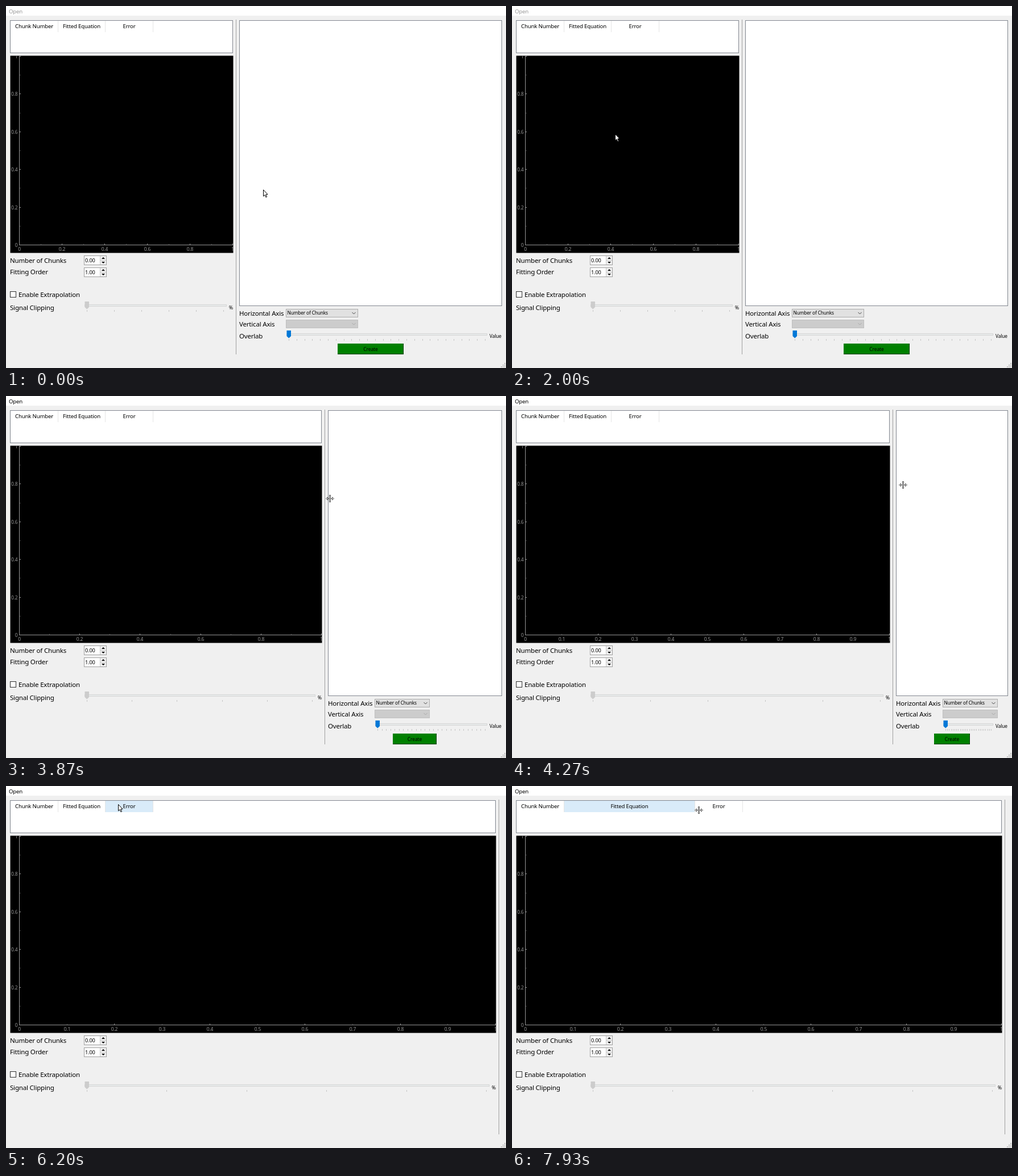
These frames come from a looping animation (879 by 637 pixels, 8 s). An HTML page with a canvas:

```html
<!DOCTYPE html>
<html lang="en">
<head>
<meta charset="utf-8">
<title>Chunk fitting window</title>
<style>
  html, body { margin: 0; width: 100%; height: 100%; overflow: hidden; background: #f0f0f0; }
  canvas { display: block; }
</style>
</head>
<body>
<canvas id="stage" width="879" height="637"></canvas>
<script>
const ctx = document.getElementById('stage').getContext('2d');
const LOOP = 8000, STEP = 1000 / 15, MAX_MOVE = 600, LAG = 63.5;
const GRAB = 2990, PRESS = 3460, COLLAPSE = 4840, LEAVE = 5610;
const COLUMN_GRAB = 6500, COLUMN_DRAG = 7740;

// Pointer stops: arrival time, x, y
const stops = [
  [0, 452, 323], [600, 604, 584], [1100, 645, 430], [1700, 351, 400],
  [2000, 181, 225], [2600, 407, 170], [3600, 404, 176], [3867, 569, 180],
  [4267, 687, 156], [5267, 857, 147], [6200, 197, 32], [6933, 176, 41],
  [7733, 176, 41], [7933, 328, 42]
];

// Rest at a stop, then ease out towards the next one
function pointerAt(t) {
  const next = stops.findIndex(s => s[0] > t);
  if (next < 0) return stops[stops.length - 1].slice(1);
  const [t0, x0, y0] = stops[next - 1], [t1, x1, y1] = stops[next];
  const left = Math.min(1, (t1 - t) / Math.min(MAX_MOVE, t1 - t0));
  const k = 1 - left * left;
  return [x0 + (x1 - x0) * k, y0 + (y1 - y0) * k];
}

function splitAt(t) {
  if (t > COLLAPSE) return 861;
  if (t < PRESS) return 399;
  return Math.min(664, Math.round(pointerAt(t - LAG)[0] - 5));
}

function rect(x, y, w, h, fill) {
  ctx.fillStyle = fill;
  ctx.fillRect(x, y, w, h);
}

function box(x, y, w, h, fill, border) {
  rect(x, y, w, h, border);
  rect(x + 1, y + 1, w - 2, h - 2, fill);
}

function text(str, x, midY, size, color = '#000', align = 'left') {
  ctx.font = `${size}px "Noto Sans", "Open Sans", sans-serif`;
  ctx.letterSpacing = `${-0.0165 * size}px`;
  ctx.textAlign = align;
  ctx.fillStyle = color;
  ctx.fillText(str, x, midY + size * 0.36);
}

function shape(points, fill, stroke, close = true) {
  ctx.beginPath();
  for (const [x, y] of points) ctx.lineTo(x, y);
  if (close) ctx.closePath();
  if (fill) { ctx.fillStyle = fill; ctx.fill(); }
  if (stroke) { ctx.strokeStyle = stroke; ctx.lineWidth = 1; ctx.stroke(); }
}

function spinBox(y, value) {
  box(137, y, 40, 17, '#fff', '#a0a0a0');
  rect(165, y + 1, 11, 15, '#c8c8c8');
  rect(166, y + 1, 10, 7, '#f0f0f0');
  rect(166, y + 9, 10, 7, '#f0f0f0');
  for (const side of [-1, 1]) {
    const base = y + 8.5 + side * 2.5;
    shape([[168, base], [174, base], [171, base + side * 3]], '#000');
  }
  text(value, 139, y + 8.5, 9.2);
}

function comboBox(x, y, w, label, fill, border, arrow) {
  box(x, y, w, 15, fill, border);
  text(label, x + 2.5, y + 7.5, 8.3);
  const cx = x + w - 7.5;
  shape([[cx - 3, y + 6], [cx, y + 9], [cx + 3, y + 6]], null, arrow, false);
}

function slider(x, y, end, lastTick, intervals, color) {
  box(x, y + 5, end - x, 4, '#e7eaea', '#d6d6d6');
  for (let i = 0; i <= intervals; i++)
    rect(Math.round(x + 4 + (lastTick - x - 4) * i / intervals), y + 15, 1, 3, '#c4c4c4');
  const l = x + 0.5, r = x + 8;
  shape([[l, y], [r, y], [r, y + 10], [x + 4.2, y + 13.5], [l, y + 10]], color);
}

function header(split, colEnd, hover) {
  box(7, 25, split - 7, 58, '#fff', '#828790');
  if (hover === 'fitted') rect(91, 26, colEnd - 91, 20, '#d9ebf9');
  if (hover === 'error') rect(colEnd, 26, 84, 20, '#d9ebf9');
  for (const x of [91, colEnd, colEnd + 84]) rect(x, 26, 1, 20, '#e5e5e5');
  text('Chunk Number', 49.5, 36, 9.6, '#000', 'center');
  text('Fitted Equation', (91 + colEnd) / 2 + 0.5, 36, 9.6, '#000', 'center');
  text('Error', colEnd + 42.5, 36, 9.6, '#000', 'center');
}

function plot(split) {
  const gray = '#969696', dim = '#383838';
  ctx.save();
  ctx.beginPath();
  ctx.rect(7.5, 87.5, split - 7, 347);
  ctx.clip();
  rect(7, 87, split, 348, '#000');
  rect(23, 88, 1, 333, gray);
  rect(23, 420, split - 23, 1, gray);
  for (let i = 0; i <= 10; i++) {
    const x = Math.round(23 + (split - 24) * i / 10), y = Math.round(420 - 33.2 * i);
    const major = i % 2 === 0, label = String(i / 10);
    rect(x, 418, 1, 2, major ? gray : dim);
    rect(24, y, 2, 1, major ? gray : dim);
    if (major) text(label, 20.5, y + 0.5, 8.5, gray, 'right');
    if (major || split > 610) text(label, x + 0.5, 428, 8.5, gray, 'center');
  }
  ctx.restore();
}

function leftPanel(split) {
  plot(split);
  text('Number of Chunks', 7, 447.5, 11.5);
  text('Fitting Order', 7, 468, 11.5);
  spinBox(439, '0.00');
  spinBox(460, '1.00');
  box(7, 502, 11, 11, '#fff', '#333');
  text('Enable Extrapolation', 22, 507.5, 11.5);
  text('Signal Clipping', 7, 530.5, 11.5);
  slider(138, 520, split - 11, split - 17, 5, '#ccc');
  text('%', split, 530.5, 8.5, '#000', 'right');
}

function rightPanel(split) {
  const left = split + 11, field = left + 83, width = 871 - left;
  const comboWidth = Math.round(Math.max(95.5, (871 - field) / 3));
  box(left, 25, width + 1, 503, '#fff', '#828790');
  text('Horizontal Axis', left, 540.5, 11.5);
  text('Vertical Axis', left, 560, 11.5);
  text('Overlab', left, 581, 11.5);
  comboBox(field - 1, 533, comboWidth + 1, 'Number of Chunks', '#e1e1e1', '#adadad', '#444');
  comboBox(field - 1, 552, comboWidth + 1, '', '#ccc', '#bfbfbf', '#aaa');
  slider(field, 571, 846, 842, 25, '#0078d7');
  text('Value', 850, 581, 8.4);

  const w = Math.round(Math.max(62, width / 4)), x = Math.floor((left + 871 - w) / 2);
  rect(x, 594, w + 1, 19, '#003c00');
  rect(x, 594, w, 18, '#008000');
  text('Create', x + w / 2 + 0.5, 604, 8.5, '#000', 'center');
}

function arrowPointer() {
  shape([[0.5, 0.5], [0.5, 11.8], [3, 9.5], [4.9, 13.6], [6.6, 12.8], [4.8, 8.8], [8, 8.5]], '#fff', '#000');
}

function splitPointer() {
  ctx.translate(0.5, 0.5);
  for (const side of [-1, 1]) {
    shape([[side * 7, 0], [side * 4, -2.5], [side * 4, 2.5]], '#fff', '#555');
    shape([[side * 4, 0], [side, 0]], null, '#555', false);
  }
  rect(-1.5, -6.5, 3, 13, '#666');
  rect(-0.5, -5.5, 1, 11, '#ccc');
}

function draw(t) {
  const [px, py] = pointerAt(t).map(Math.round);
  const split = splitAt(t);
  const overColumn = t > COLUMN_GRAB;
  const colEnd = t > COLUMN_DRAG ? px - 7 : 174;
  let hover = '';
  if (overColumn) hover = 'fitted';
  else if (t > LEAVE && py < 46 && px < 258) hover = 'error';

  rect(0, 0, 879, 637, '#f0f0f0');
  rect(0, 0, 879, 17, '#fff');
  text('Open', 5, 9.5, 9.6, t > PRESS ? '#000' : '#999');
  header(split, colEnd, hover);
  leftPanel(split);
  rect(split + 5, 24, 1, 589, '#a0a0a0');
  if (t <= COLLAPSE) rightPanel(split);
  for (let row = 0; row < 3; row++)
    for (let col = 2 - row; col < 3; col++) rect(870 + col * 3, 628 + row * 3, 2, 2, '#bfbfbf');

  ctx.save();
  ctx.translate(px, py);
  if ((t > GRAB && t < LEAVE) || overColumn) splitPointer();
  else arrowPointer();
  ctx.restore();
}

function tick() {
  const now = (performance.now() + 4) % LOOP;
  draw(Math.floor(now / STEP) * STEP);
  requestAnimationFrame(tick);
}
tick();
</script>
</body>
</html>
```
